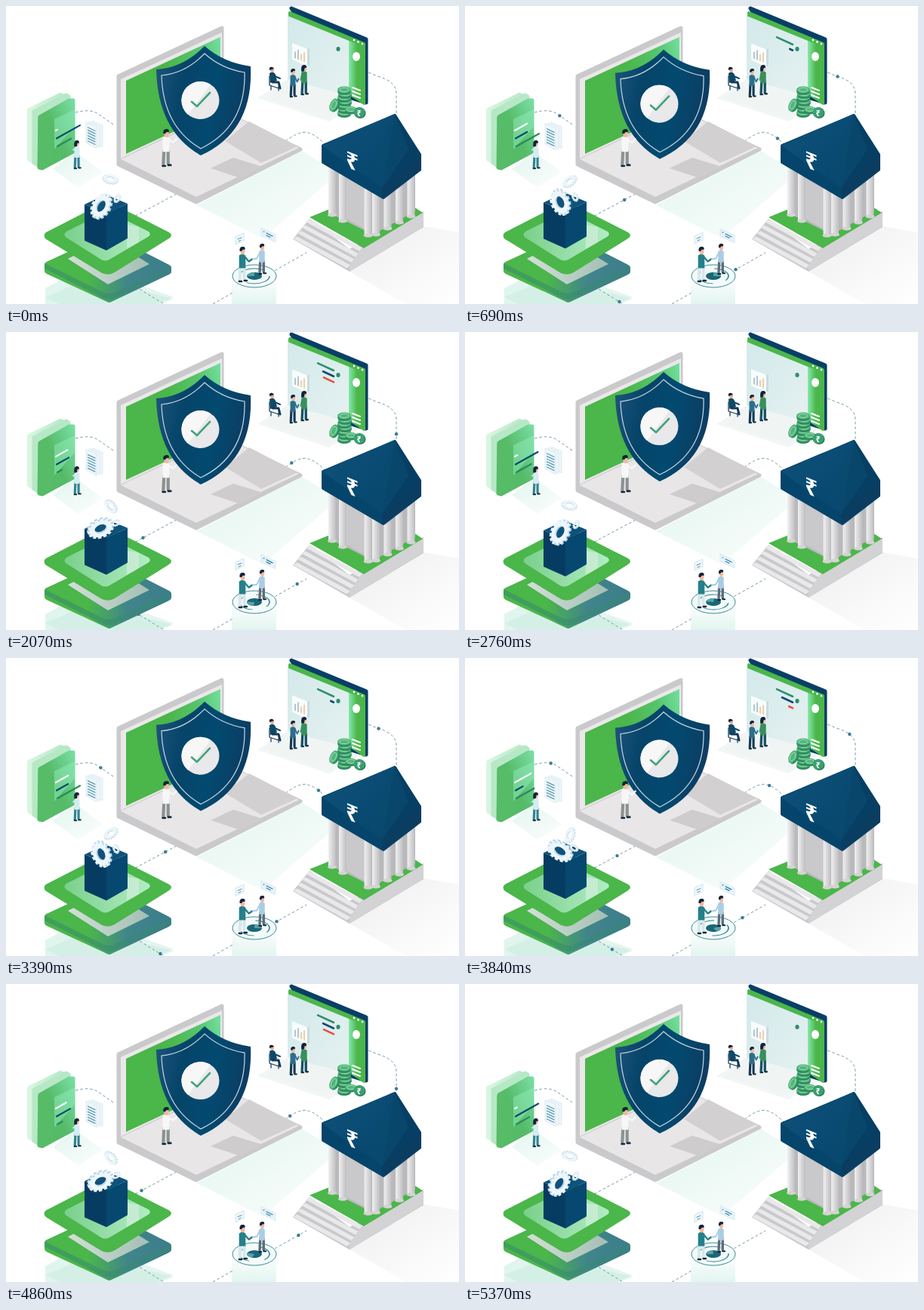
Animation of 600 by 395 pixels, one loop 5.4 s. Source, as an HTML page:

```html
<!DOCTYPE html>
<html lang="en">
<head>
<meta charset="utf-8">
<title>Secure banking scene</title>
<style>
html,body{margin:0;width:100%;height:100%;overflow:hidden;background:#fff}
svg{display:block;width:600px;height:395px}
.dash{fill:none;stroke:#7799a9;stroke-width:1;stroke-dasharray:3.5 3}
text{font-family:"Noto Sans","DejaVu Sans",sans-serif;font-weight:700;fill:#fff}
</style>
</head>
<body>
<svg id="stage" viewBox="0 0 600 395"></svg>
<script>
const LOOP = 2700;
const stage = document.getElementById('stage');

const repeat = (n, draw) => Array.from({ length: n }, (_, i) => draw(i)).join('');
const poly = (pts, fill, more = '') => `<polygon points="${pts}" fill="${fill}" ${more}/>`;
const soft = (pts, fill, w = 6) => poly(pts, fill, `stroke-linejoin="round" stroke="${fill}" stroke-width="${w}"`);
const path = (d, fill, more = '') => `<path d="${d}" fill="${fill}" ${more}/>`;
const line = (d, color, w = 1.5, more = '') =>
  `<path d="${d}" fill="none" stroke="${color}" stroke-width="${w}" stroke-linecap="round" stroke-linejoin="round" ${more}/>`;
const oval = (x, y, rx, ry, fill, more = '') =>
  `<ellipse cx="${x}" cy="${y}" rx="${rx}" ry="${ry}" fill="${fill}" ${more}/>`;
const group = (id, body) => `<g id="${id}">${body}</g>`;
const grad = (id, x2, y2, ...stops) =>
  `<linearGradient id="${id}" x2="${x2}" y2="${y2}">` +
  stops.map((s, i) => `<stop offset="${i / (stops.length - 1)}" stop-color="${s}"/>`).join('') +
  '</linearGradient>';

// Standing figure; (x, y) is the top of the head, h the full height.
function person(x, y, h, shirt, pants, arm = '', longHair = false) {
  const k = h / 48;
  return `<g transform="translate(${x} ${y}) scale(${k * .88} ${k})">
    ${line('M-3 27L-4 45M3 27L3 44', pants, 4.5)}
    ${line('M-5 47h4M3 46h4', '#12283c', 2.5)}
    ${path('M-5 12Q0 8 5 12L5 29H-5Z', shirt)}
    ${arm && line(arm, shirt, 2.5)}
    ${oval(.5, 6, 3.5, 4.5, '#f3b8a0')}
    ${path(longHair ? 'M-5 11Q-7 0 0 0Q5 0 4 5Q0 3 0 10Z' : 'M-4 6Q-5 0 1 0Q5 0 4 4Q0 3 -1 6Z', '#10233a')}
  </g>`;
}

const coin = (x, y, rx = 9, ry = 4.5) =>
  oval(x, y + 2.5, rx, ry, '#2d8a5f') + oval(x, y, rx, ry, '#52b67a') +
  oval(x, y, rx * .66, ry * .6, 'none', 'stroke="#b0e4c2" stroke-width=".8"');

function gear(id, r) {
  const ring = (color, dy) => `<g transform="translate(0 ${dy})" fill="none" stroke="${color}">
    <circle r="${r * .64}" stroke-width="${r * .38}"/>
    <circle r="${r * .89}" stroke-width="${r * .22}" pathLength="56" stroke-dasharray="2.4 1.6"/></g>`;
  return group(id, ring('#b9d5e6', r * .17) + ring('#edf6fb', 0));
}

const defs = `<defs>
  ${grad('screen', 1, -.3, '#4bb64a', '#4bb64a', '#56c46c', '#7de9b0')}
  ${grad('shield', 1, .2, '#20557c', '#064469', '#034a70', '#0c3d63')}
  ${grad('card', 1, -1, '#55bb68', '#78dca2', '#9cf0c4')}
  ${grad('back', 1, 0, '#d9f5e1', '#b5e9c8')}
  ${grad('band', 1, 0, '#86e8ac', '#4bb64a', '#4bb64a')}
  ${grad('pane', 1, 1, '#d3e9ea', '#e5f1f0')}
  ${grad('floor', 1, 1, '#e3f5ee', '#fbfefd')}
  ${grad('haze', 1, 1, '#efefef', '#fff')}
  ${grad('beam', 0, 1, '#fff', '#e2f5f0')}
  ${grad('plate', 1, 0, '#4bb64a', '#4bb64a', '#41858b', '#3c7d8a')}
  ${grad('mint', 1, 0, '#7ad08c', '#b2ecc4')}
  ${grad('tray', 1, 0, '#d3dfd8', '#a3bfb4')}
  ${grad('roof', 1, 1, '#10527b', '#04456b')}
  ${grad('column', 1, 0, '#f1f0f1', '#bebdc0')}
</defs>`;

const shadows =
  poly('253,264 392,192 440,222 340,308', 'url(#floor)') +
  poly('455,352 553,292 600,300 600,395 530,395', 'url(#haze)') +
  poly('62,216 91,193 128,220 96,241', 'url(#floor)') +
  poly('52,374 88,355 222,388 205,395 52,395', '#e0f5ed') +
  poly('52,386 130,352 222,386 200,395 70,395', '#c9ecdf', 'opacity=".5"') +
  poly('299,357 358,357 358,395 299,395', 'url(#beam)');

// Every dot crosses its whole route once per loop; the ends lie behind objects.
const routes = [
  'M468 84L480 88L492 93Q517 100 517 116V160',
  'M428 189Q412 171 400 168Q388 164 364 184',
  'M142 157L122 143Q106 132 70 150',
  'M226 249L168 280',
  'M345 357L398 327',
  'M219 401L162 366'
];
const trails = routes.map((d, i) => `<path id="route${i}" class="dash" d="${d}"/>`).join('') +
  '<path class="dash" d="M274 395L302 379"/>';
const dots = repeat(routes.length, i => `<circle id="dot${i}" r="2.2" fill="#3a7d94"/>`);

const laptop =
  soft('149,93 286,29 286,140 390,190 252,260 149,210', '#cac9cb', 5) +
  poly('152,97 286,35 286,138 152,202', '#ebe8ea') +
  poly('159,99 284,41 284,138 159,196', 'url(#screen)') +
  poly('152,203 288,139 388,188 252,253', '#e9e6e8') +
  poly('290,179 322,153 386,186 338,208', '#d2d0d1') +
  poly('271,215 301,201 340,213 310,228', '#cecccd');

const shield = group('shieldBody',
  path('M263 53Q288 75 324 80Q328 166 258 198Q201 166 199 84Q235 82 263 53Z', 'url(#shield)') +
  path('M263 63Q285 83 316 88Q318 160 258 189Q208 160 206 92Q238 89 263 63Z', 'none', 'stroke="#c4d6e2" stroke-width="1.2"') +
  oval(257.5, 125, 25, 25, '#e9e8ea') +
  path('M244 104A25 25 0 0 0 241 144L271 104A25 25 0 0 0 244 104Z', '#f8f7f8') +
  line('M246 127L253 133L270 115', '#43a27b', 2.6));

const webWindow =
  poly('333,122 373,97 470,128 428,153', '#f2f6f4') +
  soft('378,3 477,44 477,128 458,122', '#093f66', 5) +
  soft('376,9 474,50 474,129 456,116 456,48 376,14', '#4bb64a', 4) +
  poly('373,13 454,46 454,120 373,98', 'url(#pane)') +
  poly('454,46 476,54 476,131 454,118', 'url(#band)') +
  repeat(3, i => oval(461 + 5.5 * i, 45 + 2.5 * i, 1.3, 1.5, '#fff')) +
  oval(464, 67, 5, 6, '#fff') +
  repeat(3, i => line(`M459 ${108 + 5 * i}l10 4`, '#fff', 2)) +
  poly('345,122 373,97 454,119 430,148', '#f0f5f4') +
  oval(440, 57, 2.6, 3, '#2e8c70') +
  group('chart', poly('379,49 399,57 399,80 379,71', '#f8fcfc') + poly('399,57 402,56 402,78 399,80', '#c9dbe0') +
    repeat(4, i => line(`M${383 + 4 * i} ${69 + 1.6 * i}v${-8 - i % 2 * 4}`, i < 2 ? '#8dabb8' : '#eab87e', 1.3))) +
  repeat(3, i => line('', ['#2f8e70', '#124a70', '#e4513c'][i], 2.6, `id="note${i}"`)) +
  line('M349 93L349 105L361 109M351 106V111M361 107V112', '#173a55', 1.3) +
  path('M349 89Q354 85 357 91L359 99L350 102Z', '#0e4a68') +
  line('M353 101L361 101L363 109', '#153955', 3) + line('M356 93L363 96', '#0e4a68', 2) +
  oval(352.5, 84.5, 2.5, 3.2, '#e9ac93') + path('M349 85Q348 80 353 81L355 83Z', '#10233a') +
  person(380, 83, 38, '#2d6d8b', '#153a56', 'M4 14L8 22L11 17') +
  person(395, 78, 40, '#378f5a', '#155164', 'M-4 14L-6 24', true);

const coins =
  repeat(7, i => coin(448 + i % 2, 141 - 5 * i)) + coin(457, 137, 8, 4) +
  `<g transform="rotate(-65 434 131)">${coin(434, 131, 9, 5)}</g>` +
  oval(469, 142, 7.5, 7, '#237453') + oval(468, 141, 7.5, 7, '#3a9f70') +
  '<text x="464.5" y="145.5" font-size="11">₹</text>';

const column = (x, foot) =>
  `<rect x="${x}" y="205" width="10" height="${foot - 205}" fill="url(#column)"/>` +
  oval(x + 5, foot, 6, 2.6, '#d4d3d5');

const bank =
  poly('402,282 455,322 553,272 553,293 455,352 380,309', '#c9c8ca') +
  repeat(4, i => `<g transform="translate(${-5.5 * i} ${7.5 * i})">${poly('402,283 473,321 468,325 397,286', '#e9e8ea')}</g>`) +
  poly('473,318 553,273 553,292 455,352 455,344', '#d3d2d4') +
  poly('402,280 474,321 552,274 500,240', '#4bb64a') +
  poly('430,210 486,242 542,215 542,272 486,303 430,275', '#b9b8bb') +
  poly('447,220 476,235 476,296 447,280', '#c9c8ca') +
  [0, 1, 3.4].map(i => column(427 + 14 * i, 277 + 8 * i)).join('') +
  repeat(4, i => column(485 + 15.5 * i, 303 - 8 * i)) +
  soft('420,185 515,145 548,197 548,217 500,254 420,207', '#07436a', 4) +
  poly('419,185 515,143 498,243', 'url(#roof)') +
  poly('515,143 550,197 498,245', '#073e63') +
  poly('515,143 480,226 498,242 533,190', '#0b4a6f', 'opacity=".7"') +
  poly('419,186 498,241 499,255 419,207', '#05456c') +
  poly('498,243 550,198 550,217 499,255', '#0b3d60') +
  '<text transform="translate(450 213) skewY(22)" font-size="30">₹</text>';

const platform =
  soft('55,343 135,306 215,347 215,352 137,389 55,351', 'url(#plate)', 8) +
  path('M51 341L128 379Q136 383 145 379L219 346V350L145 387Q137 391 128 387L51 348Z', '#388a6d', 'opacity=".55"') +
  poly('82,335 135,308 190,342 135,369', 'url(#tray)') +
  path('M53 300L127 262Q134 259 141 262L216 300Q222 304 216 308L144 353Q136 358 127 354L53 309Q48 304 53 300Z', '#4bb64a') +
  path('M80 299L128 275Q135 272 141 275L189 299Q193 303 188 306L137 336Q131 339 126 336L80 307Q75 303 80 299Z', 'url(#mint)') +
  poly('160,290 176,293 176,313 160,322', '#d9efe0', 'opacity=".6"') +
  group('cube',
    poly('104,263 132,250 161,262 133,275', '#0f527b') +
    poly('104,263 133,275 133,324 104,311', '#073c62') +
    poly('133,275 161,262 161,308 133,324', '#06486f')) +
  gear('gearTop', 11) + gear('gearSmall', 6.5) + gear('gearBig', 18.5);

const card =
  soft('31,138 72,118 78,120 78,190 42,209 31,203', 'url(#back)', 6) +
  soft('37,140 80,118 83,120 83,193 45,213 37,208', '#b7e8c6', 5) +
  soft('45,147 84,125 89,125 89,193 48,215 44,214', 'url(#card)', 5) +
  poly('42,148 60,139 64,206 46,217 42,214', '#5abc67', 'opacity=".45"') +
  poly('64,150 91,137 91,160 64,190', '#92ecba', 'opacity=".5"') +
  repeat(3, i => line('', ['#f4fff8', '#0c4a70', '#28895d'][i], 2.2, `id="bar${i}"`)) +
  person(94, 178, 38, '#d4edf3', '#328392', 'M-3 14L-7 16', true);

const docs = group('docs',
  repeat(3, i => `<g transform="translate(${8 - i * 4} ${i})">` +
    poly('106,152 120,158 120,187 106,179', '#eef6fa', 'stroke="#d3e5ec" stroke-width=".7"') + '</g>') +
  repeat(6, i => line(`M108.5 ${161 + i * 3.6}l9.5 4.5`, '#5a9cb5', 1.3)));

const meeting =
  oval(329, 358, 29, 15, '#f3fbfa', 'stroke="#3f8a96" stroke-width="1"') +
  `<g transform="translate(329 358) scale(1 .5)"><g id="dial" fill="none">
    <circle r="20" stroke="#2f8390" stroke-width="1.6" stroke-dasharray="42 21"/>
    <circle r="10" fill="#1c6678"/><path d="M0 0L-10 0A10 10 0 0 1 0 -10Z" fill="#58a3a6"/></g></g>` +
  person(313, 319, 47, '#24808b', '#d8e7eb', 'M4 14L10 20L15 17') +
  person(339, 315, 41, '#a9cde5', '#5c6c79', 'M-4 14L-9 23L-16 24') +
  group('tagLeft', poly('304,306 315,301 315,311 304,316', '#f1f8fb', 'stroke="#c5dfea" stroke-width=".8"') +
    line('M307 309L312 307M308 312L311 310.5', '#4a90ab', 1)) +
  group('tagRight', poly('338,294 357,303 357,313 338,304', '#e7f3f9', 'stroke="#d3e6ef" stroke-width=".8"') +
    line('M341 299h1M345 301L353 305M345 304L350 306.5', '#2f7fa2', 1.2));

stage.innerHTML = defs + shadows + trails + dots + laptop + shield +
  person(212, 163, 50, '#f7f7f8', '#8a9292', 'M4 14L10 17L15 13') +
  webWindow + coins + bank + platform + card + docs + meeting;

const el = {};
stage.querySelectorAll('[id]').forEach(n => el[n.id] = n);

const clamp = v => Math.min(1, Math.max(0, v));
const move = (id, x, y) => el[id].setAttribute('transform', `translate(${x} ${y})`);
const spin = (id, x, y, turn, flat) =>
  el[id].setAttribute('transform', `translate(${x} ${y}) rotate(${turn}) scale(1 ${flat})`);

// p is the progress through one loop, 0 to 1.
function render(p) {
  const lift = (1 - Math.cos(2 * Math.PI * p)) / 2;
  const arc = Math.sin(Math.PI * p);
  const turn = -180 * p - 12 * lift;

  move('shieldBody', 0, 9 * lift);
  move('cube', 0, -5 * lift);
  move('docs', 0, 3.5 * lift);
  move('chart', 0, lift);
  move('tagLeft', 0, -1.5 * lift);
  move('tagRight', 0, 2 * lift);
  spin('gearBig', 125.5, 265 - 9 * lift, turn - 60, .66);
  spin('gearTop', 138.5, 229 + 6 * lift, turn + 15, .58);
  spin('gearSmall', 147 - 3 * lift, 255 - 3 * lift, turn - 60, .62);
  el.dial.setAttribute('transform', `rotate(${360 * p})`);

  routes.forEach((_, i) => {
    const route = el['route' + i];
    const { x, y } = route.getPointAtLength(p * route.getTotalLength());
    move('dot' + i, x, y);
    el['dot' + i].setAttribute('opacity', clamp(15 * Math.min(p, 1 - p) - .3));
  });

  const lengths = [2 + 20 * arc, 31 - 22 * arc, 18 + 12 * Math.sin(2 * Math.PI * p)];
  lengths.forEach((len, i) =>
    el['bar' + i].setAttribute('d', `M${66 + i} ${165 + 10.5 * i}l${len} ${-.56 * len}`));

  // Notes grow one after another from the right end, then shrink together.
  for (let i = 0; i < 3; i++) {
    const k = clamp((p - .06 - .15 * i) / .17) * clamp((.98 - p) / .15);
    const w = (i ? 15 - i : 21) * k;
    el['note' + i].setAttribute('d', k ? `M434 ${51 + 7.7 * i}l${-w} ${-.46 * w}` : '');
  }
}

function tick() {
  render(performance.now() % LOOP / LOOP);
  requestAnimationFrame(tick);
}
tick();
</script>
</body>
</html>
```
